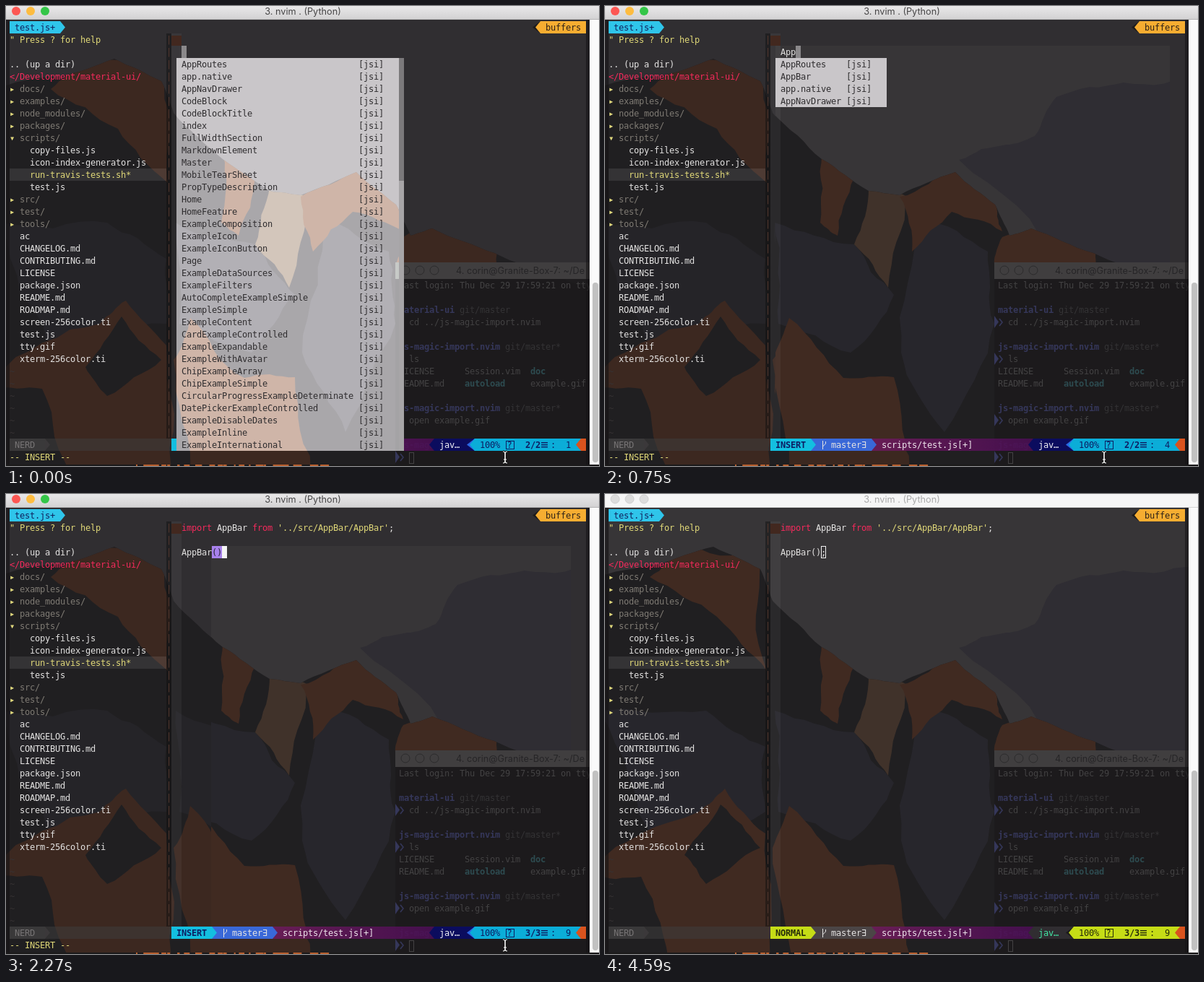
An HTML page with a canvas for the animation above (4.69 s loop, 821 by 637 pixels).

```html
<!DOCTYPE html>
<html lang="en">
<head>
<meta charset="utf-8">
<title>Editor completion</title>
<style>
  html, body { margin: 0; width: 100%; height: 100%; overflow: hidden; background: #222; }
  canvas { display: block; width: 821px; height: 637px; }
</style>
</head>
<body>
<canvas id="stage" width="821" height="637"></canvas>
<script>
const W = 821, H = 637, LOOP = 4690, CELL = 7, LINE = 17;
let g = document.getElementById('stage').getContext('2d');

const colX = c => 5 + c * CELL;
const rowY = r => 21 + r * LINE;

let seed = 1;
function random() {
  seed = seed * 16807 % 2147483647;
  return seed / 2147483647;
}

function box(x0, y0, x1, y1, color) {
  g.fillStyle = color;
  g.fillRect(x0, y0, x1 - x0, y1 - y0);
}

// Pointed end of a bar: base at x, tip `reach` pixels to the side
function tip(x, row, reach, color) {
  const y = rowY(row);
  g.fillStyle = color;
  g.fill(new Path2D(`M${x},${y}l${reach},${LINE / 2}l${-reach},${LINE / 2}z`));
}

// Bar over columns c0 to c1, pointing right (1), left (-1) or nowhere (0)
function bar(c0, c1, row, color, dir = 0) {
  box(colX(c0), rowY(row), colX(c1), rowY(row + 1), color);
  if (dir) tip(colX(dir > 0 ? c1 : c0), row, dir * CELL, color);
}

// Monospace text, one glyph per cell
function mono(str, col, row, color, bold) {
  g.font = (bold ? 'bold ' : '') + '12px "DejaVu Sans Mono", monospace';
  g.textAlign = 'left';
  g.fillStyle = color;
  [...str].forEach((ch, i) => {
    if (ch !== ' ') g.fillText(ch, colX(col + i), rowY(row) + 13);
  });
}

function title(str, x, y, color, align) {
  g.font = '12.7px Inter, sans-serif';
  g.textAlign = align;
  g.fillStyle = color;
  g.fillText(str, x, y);
}

function dot(x, y, r, fill, line) {
  g.beginPath();
  g.arc(x, y, r, 0, 7);
  if (fill) { g.fillStyle = fill; g.fill(); }
  if (line) { g.strokeStyle = line; g.lineWidth = 1; g.stroke(); }
}

// ---- Wallpaper ----
const DARK = { sky: '#302e31', shade: '#201f21', snow: '#252428', sun: '#3c2820', glow: '#40322a' };
const CLOUDY = { ...DARK, sky: '#373537', cloud: '#2f2d33', snow: '#27262c', sun: '#402a21' };
const PALE = { sky: '#c9c6c9', shade: '#a9a7aa', snow: '#b2b0b5', sun: '#cfb5a8', glow: '#d3c6bb' };

// Outline through key points, made jagged by midpoint displacement
function crag(key, rough = .07) {
  let pts = key.split(' ').map(p => p.split(',').map(Number));
  for (let level = 0; level < 3; level++) {
    pts = pts.flatMap(([x, y], i) => {
      const [nx, ny] = pts[(i + 1) % pts.length];
      const push = (random() - .5) * 2 * rough;
      return [[x, y], [(x + nx) / 2 - (ny - y) * push, (y + ny) / 2 + (nx - x) * push]];
    });
  }
  return new Path2D('M' + pts.join(' ') + 'Z');
}

function face(color, key) {
  g.fillStyle = color;
  g.fill(crag(key));
}

function mountains(p) {
  seed = 7;
  box(0, 0, W, H, p.sky);
  if (p.cloud) face(p.cloud, '490,213 555,192 595,180 625,126 718,106 830,102 830,370 640,350');

  const ridge = crag('-20,114 72,98 150,73 215,104 232,148 300,212 365,256 408,262 485,230 540,275 560,318 590,308 676,342 850,400 850,700 -20,700', .03);
  g.fillStyle = p.shade;
  g.fill(ridge);
  g.save();
  g.clip(ridge);
  face(p.snow, '-10,300 140,300 222,350 222,440 70,490');
  face(p.snow, '235,300 345,330 400,400 340,480 240,440');
  face(p.snow, '440,290 530,340 539,440 470,590 410,480');
  face(p.sun, '62,115 105,70 215,90 224,245 155,170');
  face(p.sun, '300,205 345,238 322,318 298,300');
  face(p.glow, '345,330 365,250 418,264 392,390');
  face(p.sun, '408,264 485,222 540,270 550,312 480,285 425,340');
  face(p.sun, '550,320 590,300 680,335 680,360 539,358');
  face(p.sun, '-20,512 130,440 166,408 222,470 225,660 -20,660');
  face(p.sun, '232,490 255,432 330,515 400,514 425,660 260,660');
  face(p.shade, '-20,530 50,530 95,660 -20,660');
  face(p.shade, '110,500 160,430 215,490 140,540');
  g.restore();
}

function backTerminal(p) {
  const isPale = p === PALE;
  box(539, 355, 808, 378, isPale ? '#c7cac7' : '#403e3f');
  box(539, 378, 808, H, isPale ? 'rgba(160,160,162,.55)' : 'rgba(27,26,27,.86)');
  if (isPale) return;

  for (let i = 0; i < 3; i++) dot(553 + 20 * i, 366, 6, null, '#2c2b2c');
  title('4. corin@Granite-Box-7: ~/De', 623, 371, '#262527', 'left');
  const dim = '#434243', faint = '#343335', blue = '#35375a', teal = '#2d4b50';
  const say = (str, col, row, color = dim, bold) => mono(str, col, row, color, bold);
  const prompt = (row, cmd) => {
    tip(539, row, 6, blue);
    g.strokeStyle = blue;
    g.lineWidth = 1.6;
    g.stroke(new Path2D(`M546,${rowY(row) + 4}l4,5l-4,5`));
    say(cmd, 79, row);
  };
  say('Last login: Thu Dec 29 17:59:21 on tty', 77, 21);
  say('material-ui', 77, 23, blue, true);
  say('git/master', 89, 23, faint);
  for (const row of [26, 31, 34]) {
    say('js-magic-import.nvim', 77, row, blue, true);
    say('git/master*', 98, row, faint);
  }
  prompt(24, 'cd ../js-magic-import.nvim');
  prompt(27, 'ls');
  prompt(32, 'open example.gif');
  prompt(35, '');
  say('LICENSE      Session.vim', 77, 28);
  say('README.md                 example.gif', 77, 29);
  say('doc', 103, 28, teal, true);
  say('autoload', 90, 29, teal, true);
  g.strokeStyle = dim;
  g.lineWidth = 1;
  g.strokeRect(558.5, 618.5, 6, 15);
}

function makeScene(p) {
  const layer = document.createElement('canvas');
  layer.width = W;
  layer.height = H;
  const keep = g;
  g = layer.getContext('2d');
  mountains(p);
  backTerminal(p);
  g = keep;
  return layer;
}

const dark = makeScene(DARK), cloudy = makeScene(CLOUDY), pale = makeScene(PALE);

function scenePart(layer, x0, y0, x1, y1) {
  const area = [x0, y0, x1 - x0, y1 - y0];
  g.drawImage(layer, ...area, ...area);
}

// ---- Completion lists ----
const ex = s => s.split(' ').map(n => 'Example' + n);
const OTHERS = [
  'app.native', 'AppNavDrawer', 'CodeBlock', 'CodeBlockTitle', 'index', 'FullWidthSection',
  'MarkdownElement', 'Master', 'MobileTearSheet', 'PropTypeDescription', 'Home', 'HomeFeature',
  ...ex('Composition Icon IconButton'), 'Page', ...ex('DataSources Filters'),
  'AutoCompleteExampleSimple', ...ex('Simple Content'), 'CardExampleControlled',
  ...ex('Expandable WithAvatar'), 'ChipExampleArray', 'ChipExampleSimple',
  'CircularProgressExampleDeterminate', 'DatePickerExampleControlled',
  ...ex('DisableDates Inline International')
];
const FIRST = ['AppRoutes', ...OTHERS];
const FULL = ['AppRoutes', 'AppBar', ...OTHERS];
const APP = FULL.filter(n => /^app/i.test(n));

// ---- Timeline: each step changes part of the state ----
const steps = [
  [0, { text: '', list: FIRST, row: 2, cloud: null, mode: 'INSERT', mouse: [691, 625], focus: true }],
  [90, { text: 'A', list: null, cloud: [236, 55, 782, 612] }],
  [300, { text: 'Ap' }],
  [480, { list: APP }],
  [570, { text: 'App', list: null }],
  [750, { list: APP }],
  [840, { text: 'AppB', list: null }],
  [1190, { list: ['AppBar'] }],
  [1640, { text: 'AppBar(', list: null, row: 3, cloud: null }],
  [1820, { list: FULL }],
  [2270, { text: 'AppBar()', list: null, cloud: [284, 72, 782, 616] }],
  [2530, { text: 'AppBar();' }],
  [2710, { list: FULL }],
  [3240, { list: null }],
  [3330, { mode: 'NORMAL', cloud: [5, 72, 796, 633] }],
  [3870, { mouse: [726, 615] }],
  [3970, { mouse: [784, 631] }],
  [4070, { mouse: null }],
  [4590, { focus: false, cloud: [0, 19, 808, H] }]
];

// ---- Window parts ----
function titleBar(focus) {
  const fade = g.createLinearGradient(0, 0, 0, 18);
  fade.addColorStop(0, focus ? '#e9e8e9' : '#f6f6f6');
  fade.addColorStop(1, focus ? '#d3d2d3' : '#f6f6f6');
  box(0, 0, W, 18, fade);
  box(0, 18, W, 19, focus ? '#b4b3b4' : '#d5d5d5');
  ['#fc5753', '#fdbc40', '#34c648'].forEach((c, i) =>
    dot(14 + 20 * i, 7, 6, focus ? c : '#dcdcdc', focus ? null : '#cfcfcf'));
  title('3. nvim . (Python)', 411, 12, focus ? '#464546' : '#a9a9a9', 'center');
}

function scrollBar() {
  box(808, 19, W, H, '#fafafa');
  g.fillStyle = '#c1c1c1';
  g.beginPath();
  g.roundRect(812, 383, 8, 249, 4);
  g.fill();
}

// Bright slivers of wallpaper below the window
function bottomEdge() {
  seed = 11;
  box(0, 635, W, H, '#1b1a1b');
  for (let x = 180; x < 450; x += 4 + random() * 14) {
    box(x, 635, x + 2 + random() * 10, H, '#b9602f');
  }
}

function tabs() {
  bar(0, 10, 0, '#2fc5ea', 1);
  mono('test.js+', 1, 0, '#10215e');
  tip(colX(105), 0, -11, '#1b1a1b');
  bar(105, 114, 0, '#f6ad31', -1);
  mono('buffers', 106, 0, '#2c2018');
}

const YELLOW = '#e0d878', WHITE = '#e4e3e2', PINK = '#f52a5c';

const TREE = `" Press ? for help

.. (up a dir)
</Development/material-ui/
▸ docs/
▸ examples/
▸ node_modules/
▸ packages/
▾ scripts/
    copy-files.js
    icon-index-generator.js
    run-travis-tests.sh*
    test.js
▸ src/
▸ test/
▸ tools/
  ac
  CHANGELOG.md
  CONTRIBUTING.md
  LICENSE
  package.json
  README.md
  ROADMAP.md
  screen-256color.ti
  test.js
  tty.gif
  xterm-256color.ti`.split('\n');

function tree() {
  bar(0, 31, 12, 'rgba(255,255,255,.09)');
  TREE.forEach((line, i) => {
    const folder = /^[▸▾]/.test(line);
    const color = folder ? '#7f7b74' : line[0] === '<' ? PINK : /^"|\*$/.test(line) ? YELLOW : WHITE;
    mono(line, 0, i + 1, color);
    if (folder) mono(line[0], 0, i + 1, YELLOW);
  });
  for (let row = 28; row < 34; row++) mono('~', 0, row, '#373334');
}

function gutter() {
  box(222, 38, 229, 599, 'rgba(15,14,15,.45)');
  for (let row = 1; row < 34; row++) mono('|', 31, row, '#54382f');
  box(229, 38, 243, 599, 'rgba(255,255,255,.045)');
  box(229, 41, 243, 55, '#42281f');
}

function statusBar(s) {
  const insert = s.mode === 'INSERT';
  const main = insert ? '#13bfe0' : '#c5dc16';
  const ink = insert ? '#0d1d62' : '#262c0a';
  const print = (str, col, color = ink, bold) => mono(str, col, 34, color, bold);

  bar(0, 32, 34, 'rgba(62,60,61,.55)');
  bar(0, 7, 34, 'rgba(66,64,65,.6)', 1);
  print('NERD', 1, '#777475');

  const purple = g.createLinearGradient(368, 0, 593, 0);
  purple.addColorStop(0, 'rgba(106,28,88,.94)');
  purple.addColorStop(1, 'rgba(74,14,84,.88)');
  bar(52, 84, 34, purple);
  bar(84, 92, 34, insert ? '#0b0c5e' : '#302d31', -1);
  tip(colX(92), 34, -11, insert ? '#2a67e4' : '#1b1a1b');
  bar(92, 113, 34, insert ? '#0badd8' : main, -1);
  bar(113, 114, 34, '#d9531e', -1);
  bar(40, 52, 34, insert ? '#3968d8' : '#4b4546', 1);
  bar(32, 40, 34, main, 1);

  print(s.mode, 33, ink, true);
  g.strokeStyle = WHITE;
  g.lineWidth = 1;
  g.stroke(new Path2D('M301.5,602v12m0,-4l4,-4v-3'));
  print('master∃', 44, WHITE);
  print('scripts/test.js[+]', 54, '#eee4ec');
  print('jav…', 85, insert ? '#f1f1f5' : '#42e6a4');

  print('100%', 93);
  g.strokeStyle = ink;
  g.strokeRect(692.5, 602.5, 11, 11);
  print('?', 98.35);
  print(s.row + '/' + s.row, 102, ink, true);
  for (let y = 604; y < 612; y += 3) box(741, y, 750, y + 1.4, ink);
  print(':', 107);
  print(String(s.text.length + (insert ? 1 : 0)).padStart(2), 109);
  if (insert) mono('-- INSERT --', 0, 35, YELLOW);
}

function code(s) {
  if (s.row === 3) {
    mono('import', 34, 1, PINK);
    mono('AppBar', 41, 1, WHITE);
    mono('from', 48, 1, PINK);
    mono("'../src/AppBar/AppBar'", 53, 1, YELLOW);
    mono(';', 75, 1, WHITE);
  }
  const normal = s.mode === 'NORMAL';
  const cursor = 34 + s.text.length - (normal ? 1 : 0);
  mono(s.text, 34, s.row, WHITE);
  if (s.text.endsWith(')')) {
    bar(cursor - 2, cursor, s.row, '#a781ea');
    mono('()', cursor - 2, s.row, '#262033');
  }
  if (s.focus) {
    bar(cursor, cursor + 1, s.row, s.list ? '#8b898b' : '#f4f4f4');
    if (normal) mono(';', cursor, s.row, '#222');
  } else {
    g.strokeStyle = '#f0f0f0';
    g.lineWidth = 1;
    g.strokeRect(colX(cursor) + .5, rowY(s.row) + .5, CELL - 1, LINE - 1);
  }
}

function popup(s) {
  const room = 34 - s.row;
  const rows = s.list.slice(0, room);
  const longest = Math.max(...rows.map(n => n.length));
  const col = 33 + (s.row === 3 ? s.text.length : 0);
  const end = col + longest + 10;
  const top = s.row + 1, bottom = top + rows.length;
  scenePart(pale, colX(col), rowY(top), colX(end), rowY(bottom));
  rows.forEach((name, i) => {
    mono(name, col + 1, top + i, '#2f2d2f');
    mono('[jsi]', col + longest + 2, top + i, '#2f2d2f');
  });
  if (s.list.length >= room) {
    box(colX(end), rowY(top), colX(end + 1), rowY(bottom), '#a7a5a7');
    box(colX(end), rowY(top), colX(end + 1), rowY(13), '#7b797b');
  }
}

// I-beam: four mirrored hooks and a crossbar
function pointer([x, y]) {
  for (const [color, width] of [['#111', 3], ['#f2f2f2', 1.2]]) {
    g.strokeStyle = color;
    g.lineWidth = width;
    for (const sx of [-1, 1]) for (const sy of [-1, 1]) {
      g.stroke(new Path2D(`M${x + 3 * sx},${y + 8 * sy}Q${x},${y + 8 * sy} ${x},${y + 5 * sy}V${y}`));
    }
    g.stroke(new Path2D(`M${x - 2},${y + 3}h4`));
  }
}

function draw(s) {
  g.drawImage(dark, 0, 0);
  if (s.cloud) scenePart(cloudy, ...s.cloud);
  box(0, 19, 5, H, 'rgba(20,19,20,.6)');
  box(803, 19, 808, H, 'rgba(20,19,20,.6)');
  titleBar(s.focus);
  tabs();
  tree();
  gutter();
  statusBar(s);
  code(s);
  if (s.list) popup(s);
  scrollBar();
  bottomEdge();
  if (s.mouse) pointer(s.mouse);
}

const start = performance.now();
let shown = -1;

function tick() {
  const t = Math.max(0, performance.now() - start) % LOOP;
  const count = steps.filter(([at]) => at <= t).length;
  if (count !== shown) {
    shown = count;
    draw(Object.assign({}, ...steps.slice(0, count).map(step => step[1])));
  }
  requestAnimationFrame(tick);
}
tick();
</script>
</body>
</html>
```
